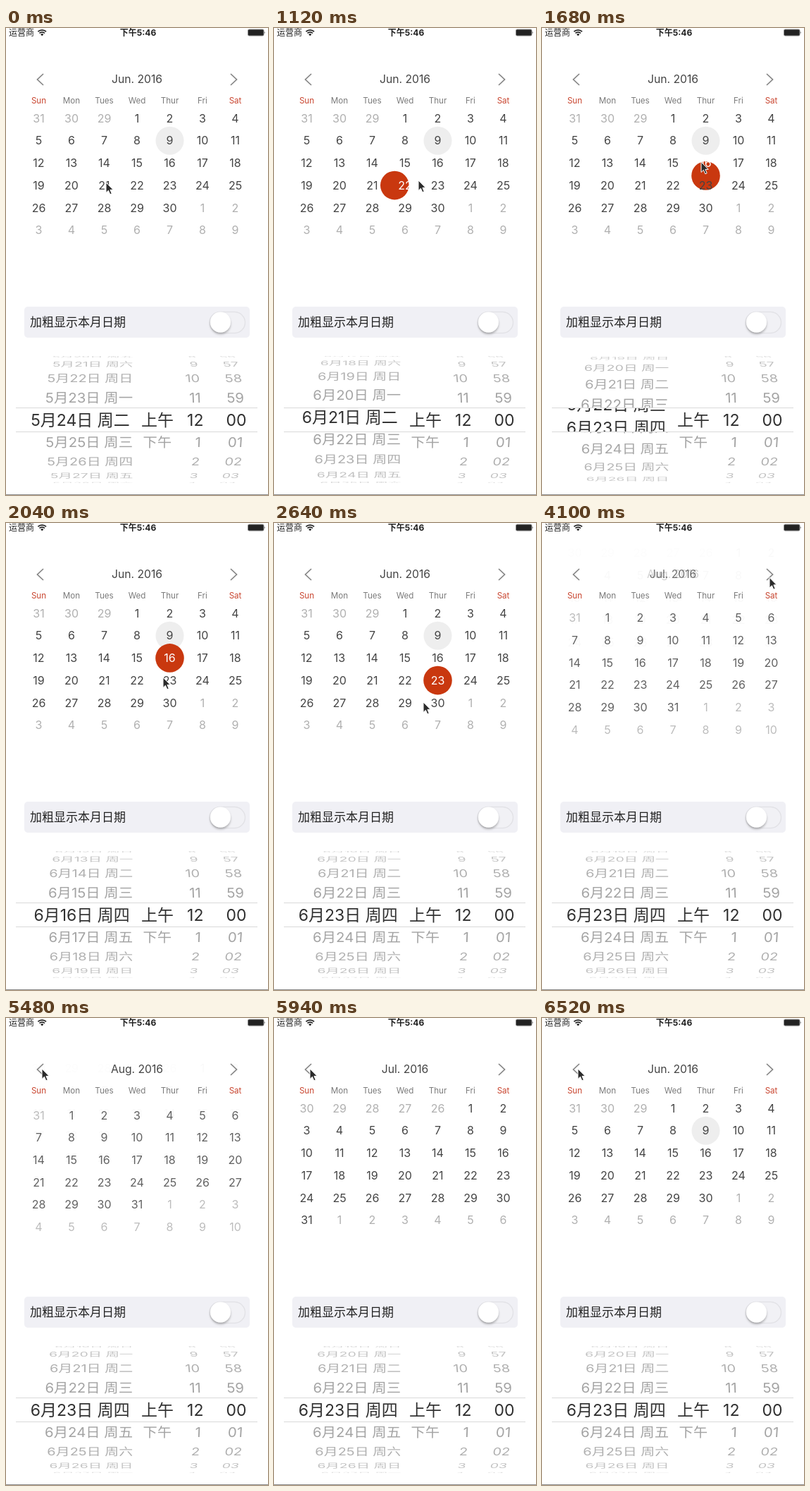
Write an HTML page that moves like this. It is 372 by 662 pixels and loops after 6.54 s.

```html
<!DOCTYPE html>
<html lang="zh-CN">
<head>
<meta charset="utf-8">
<title>Calendar</title>
<style>
html, body { margin: 0; width: 100%; height: 100%; overflow: hidden; background: #fff; }
svg { display: block; width: 372px; height: 662px; font-family: Inter, "Noto Sans CJK SC", "Noto Sans CJK", sans-serif; }
</style>
</head>
<body>
<svg id="stage" viewBox="0 0 372 662">
  <defs>
    <clipPath id="outer"><path d="M0 465H372V538H0ZM0 573H372V645H0Z"/></clipPath>
    <clipPath id="band"><path d="M0 539H372V572H0Z"/></clipPath>
    <filter id="soft" x="-50%" y="-50%" width="200%" height="200%">
      <feDropShadow dx="0" dy="2.5" stdDeviation="1.8" flood-opacity=".28"/>
    </filter>
  </defs>
  <rect width="372" height="662" fill="#fff"/>
  <g id="status" fill="#222">
    <g fill="none" stroke="#222" stroke-width="1.7">
      <path d="M45.4 5.2A8.2 8.2 0 0 1 57 5.2M47.5 7.4A5.2 5.2 0 0 1 54.9 7.4"/>
    </g>
    <path d="M49.1 9A3 3 0 0 1 53.3 9L51.2 11.2Z"/>
    <rect x="343.5" y="2" width="22.5" height="9" rx="1.8" stroke="#8a8a8a"/>
    <path d="M366.8 4.8Q368.4 6.5 366.8 8.2Z"/>
  </g>
  <g fill="none" stroke="#858585" stroke-width="1.7">
    <path d="M53 65L44.5 73L53 81M319 65L327.5 73L319 81"/>
  </g>
  <g id="months"></g>
  <g id="titles"></g>
  <g id="weekdays"></g>
  <g id="option">
    <rect x="26" y="395" width="320" height="44" rx="5" fill="#f0f0f5"/>
    <rect x="289" y="402.5" width="50.5" height="30" rx="15" fill="#f1f1f5" stroke="#e2e2e6" stroke-width="1.4"/>
    <circle cx="304.5" cy="417" r="14.4" fill="#fff" filter="url(#soft)"/>
  </g>
  <g clip-path="url(#outer)"><g id="wheel" fill="#969696"></g></g>
  <g clip-path="url(#band)"><g id="focus" fill="#303030"></g></g>
  <path d="M14 538.5H357M14 572.5H357" stroke="#d9d9d9"/>
  <rect y="661" width="372" height="1" fill="#8c8c8c"/>
  <path id="cursor" d="M0 0V14.5L3.4 11.3L5.8 16.8L8.2 15.8L5.9 10.4H10.2Z" fill="#2b2b2b" stroke="#fff" stroke-width="1"/>
</svg>
<script>
const LOOP = 6540;
const $ = id => document.getElementById(id);

function add(parent, tag, attrs) {
  const el = document.createElementNS('http://www.w3.org/2000/svg', tag);
  set(el, attrs);
  parent.appendChild(el);
  return el;
}
function set(el, attrs) {
  for (const key in attrs) el.setAttribute(key, attrs[key]);
}
function label(parent, text, x, y, size, attrs = {}) {
  const el = add(parent, 'text', { x, y: y + size * 0.36, 'font-size': size, 'text-anchor': 'middle', ...attrs });
  el.textContent = text;
  return el;
}
function ease(t, start, duration) {
  const s = Math.min(1, Math.max(0, (t - start) / duration));
  return s * s * (3 - 2 * s);
}

// Status bar, weekday header and option row
label($('status'), '运营商', 4, 6.4, 12, { 'text-anchor': 'start', 'font-weight': 500 });
label($('status'), '下午5:46', 187.5, 6.4, 12, { 'font-weight': 700 });
label($('option'), '加粗显示本月日期', 34, 417, 17, { 'text-anchor': 'start', fill: '#222' });

const colX = c => 46.5 + 46.5 * c;
const rowY = r => 128 + 31.7 * r;
['Sun', 'Mon', 'Tues', 'Wed', 'Thur', 'Fri', 'Sat'].forEach((name, c) =>
  label($('weekdays'), name, colX(c), 102.7, 11.6, { fill: c % 6 ? '#7a7a7a' : '#c9452f' }));

// Month pages; leading days count backwards from the previous month's end
const INK = '#444';
function buildMonth(month, name) {
  const page = add($('months'), 'g', {});
  const first = new Date(2016, month, 1).getDay();
  const length = new Date(2016, month + 1, 0).getDate();
  const before = new Date(2016, month, 0).getDate();
  const marks = add(page, 'g', {});
  const days = {};
  for (let i = 0; i < 42; i++) {
    const n = i - first + 1;
    const inside = n > 0 && n <= length;
    const text = n < 1 ? before - i : inside ? n : n - length;
    const el = label(page, text, colX(i % 7), rowY(Math.floor(i / 7)), 16, { fill: inside ? INK : '#b0b0b0' });
    if (inside) days[n] = el;
  }
  const title = label($('titles'), name + '. 2016', 186, 72.5, 15.7, { fill: '#444' });
  return { page, marks, days, title };
}
const months = [buildMonth(5, 'Jun'), buildMonth(6, 'Jul'), buildMonth(7, 'Aug')];
const june = months[0];
add(june.marks, 'circle', { cx: colX(4), cy: rowY(1), r: 20, fill: '#eee' });
const dot = add(june.marks, 'circle', { fill: '#c9380f' });

const turns = [
  { at: 3400, from: 0, to: 1 }, { at: 3820, from: 1, to: 2 },
  { at: 5411, from: 2, to: 1 }, { at: 5980, from: 1, to: 0 }
];
const fade = p => Math.pow(p, 1.6);
function drawMonths(t) {
  const state = months.map((_, i) => ({ alpha: i ? 0 : 1, title: i ? 0 : 1, y: 0 }));
  for (const { at, from, to } of turns) {
    if (t < at) break;
    const p = ease(t, at, 350);
    const q = ease(t, at + 170, 350);
    const dir = to > from ? 1 : -1;
    state[from] = { alpha: fade(1 - p), title: 1 - q, y: -dir * 95 * p };
    state[to] = { alpha: fade(p), title: q, y: dir * 63 * (1 - p) };
  }
  months.forEach(({ page, title }, i) => {
    set(page, { opacity: state[i].alpha, transform: `translate(0 ${state[i].y})` });
    set(title, { opacity: state[i].title });
  });
}

// Day selection and the date it sends to the wheel
const picks = [
  { at: 120, day: 21, spin: 700 }, { at: 996, day: 22, spin: 400 },
  { at: 1270, day: 23, spin: 400 }, { at: 1590, day: 16, spin: 400 },
  { at: 2090, day: 23, spin: 400 }
];
const dayPos = day => [colX((day + 2) % 7), rowY(Math.floor((day + 2) / 7))];
function drawSelection(t) {
  let [x, y] = dayPos(21);
  let chosen = 0;
  for (const { at, day } of picks) {
    if (t < at) break;
    const p = ease(t, at, 200);
    const [nx, ny] = dayPos(day);
    x += (nx - x) * p;
    y += (ny - y) * p;
    chosen = day;
  }
  if (t > 5000) chosen = 0;
  set(dot, { cx: x, cy: y, r: chosen ? 20.3 * ease(t, 120, 200) : 0 });
  for (const day in june.days) set(june.days[day], { fill: +day === chosen ? '#fff' : INK });
}

// Date wheel: a cylinder seen with slight perspective
const CENTER = 186, MID = 555.5, RADIUS = 91, STEP = 20.2 * Math.PI / 180, DEPTH = 0.11;
function roll(el, dx, k) {
  const a = k * STEP;
  const c = Math.cos(a);
  const s = 1 / (1 + DEPTH * (1 - c));
  const lean = -dx * DEPTH * Math.sin(a) / RADIUS;
  const shown = Math.abs(a) < 1.52;
  set(el, {
    transform: `matrix(${s} 0 ${lean} ${s * Math.max(c, 0.01)} ${CENTER + dx * s} ${MID + RADIUS * Math.sin(a)})`,
    opacity: shown ? 0.25 + 0.66 * c : 0
  });
}
const sideText = (text, anchor) => label($('wheel'), text, 0, 0, 20.5, { 'text-anchor': anchor });
const focusText = (text, x, anchor) => label($('focus'), text, x, MID, 23, { 'text-anchor': anchor });

for (let k = -4; k <= 4; k++) {
  if (!k) continue;
  roll(sideText((k + 11) % 12 + 1, 'end'), 91.5, k);
  roll(sideText(String((k + 60) % 60).padStart(2, '0'), 'middle'), 140.5, k);
}
roll(sideText('下午', 'middle'), 29, 1);
focusText('上午', 215, 'middle');
focusText('12', 280.5, 'end');
focusText('00', 327, 'middle');

const sideDates = Array.from({ length: 11 }, () => sideText('', 'end'));
const focusDates = Array.from({ length: 3 }, () => focusText('', 175.8, 'end'));
function dateText(n) {
  const d = new Date(2016, 4, 24 + n);
  return `${d.getMonth() + 1}月${d.getDate()}日 周${'日一二三四五六'[d.getDay()]}`;
}
function drawWheel(t) {
  let pos = 0, last = 0;
  for (const { at, day, spin } of picks) {
    const goal = day + 7;
    pos += (goal - last) * ease(t, at + 40, spin);
    last = goal;
  }
  const base = Math.round(pos);
  sideDates.forEach((el, i) => {
    const n = base + i - 5;
    el.textContent = dateText(n);
    roll(el, -6, n - pos);
  });
  focusDates.forEach((el, i) => {
    const n = base + i - 1;
    el.textContent = dateText(n);
    set(el, { transform: `translate(0 ${(n - pos) * 33})` });
  });
}

// Pointer stops: time, x, y
const path = [
  [0, 142, 219], [850, 142, 219], [990, 188, 219], [1120, 205, 216], [1260, 227, 218],
  [1360, 227, 218], [1560, 226, 190], [1780, 226, 190], [2020, 223, 219], [2180, 223, 219],
  [2560, 212, 254], [2720, 212, 254], [3300, 323, 78], [4640, 323, 77], [5280, 51, 72], [LOOP, 51, 72]
];
function drawCursor(t) {
  const i = path.findIndex(stop => stop[0] > t);
  const [t0, x0, y0] = path[i - 1];
  const [t1, x1, y1] = path[i];
  const p = ease(t, t0, t1 - t0);
  set($('cursor'), { transform: `translate(${x0 + (x1 - x0) * p} ${y0 + (y1 - y0) * p})` });
}

function draw(t) {
  drawMonths(t);
  drawSelection(t);
  drawWheel(t);
  drawCursor(t);
}
const start = performance.now();
function tick() {
  draw((performance.now() - start) % LOOP);
  requestAnimationFrame(tick);
}
tick();
</script>
</body>
</html>
```
